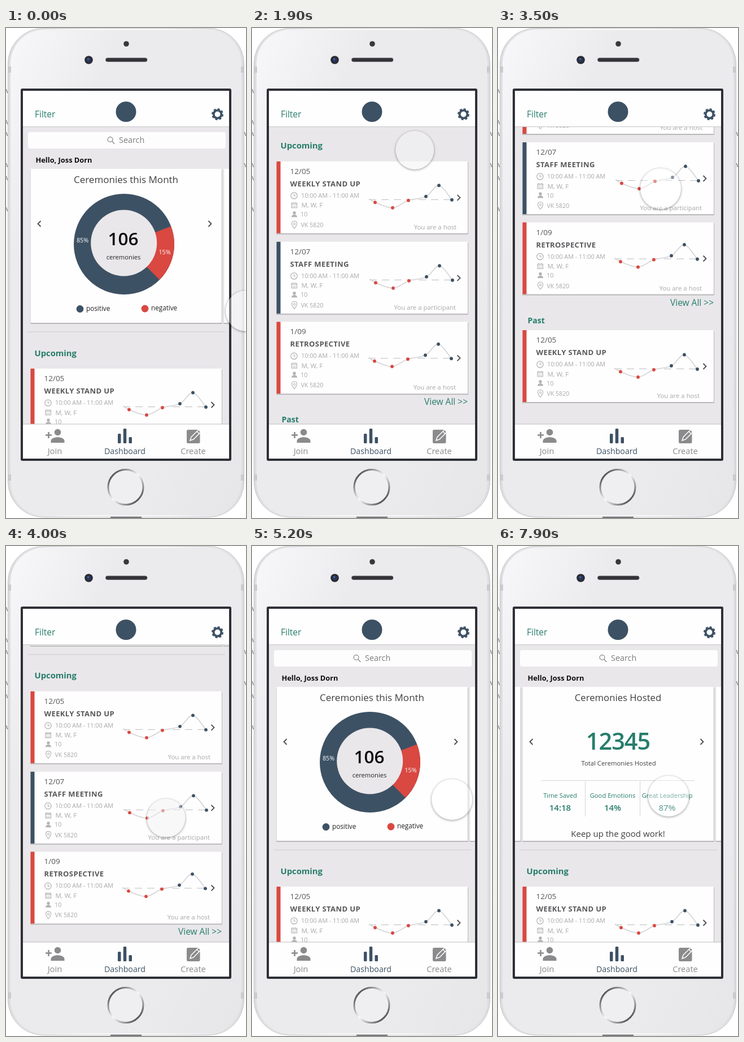
An HTML page for the animation above (8 s loop, 425 by 866 pixels).

```html
<!DOCTYPE html>
<html lang="en">
<head>
<meta charset="utf-8">
<title>Ceremony dashboard</title>
<style>
  html, body { margin: 0; width: 100%; height: 100%; overflow: hidden; background: #fff; }
  svg { position: absolute; left: 0; top: 0; display: block; }
  text { font-family: "Open Sans", "Noto Sans", sans-serif; white-space: pre; }
  #touch {
    position: absolute; left: 0; top: 0; border-radius: 50%;
    background: rgba(255, 255, 255, .38);
    box-shadow: 0 1px 4px rgba(0, 0, 0, .42);
  }
  #touch.down { background: rgba(244, 243, 245, .5); }
</style>
</head>
<body>
<svg id="stage" width="425" height="866" viewBox="0 0 425 866"></svg>
<div id="touch"></div>
<script>
const SLATE = '#3d5164', RED = '#d94841', TEAL = '#277d6b', BG = '#e9e7ea';
const GREY = '#8b8a8c', PALE = '#a9a8aa', INK = '#3f3f42', WHITE = '#fefefe';
const LOOP = 8000, STEP = 100, PAGE = 342, BOTTOM = 542;

// ---- drawing helpers ----
const text = (str, x, y, size, fill, o = {}) =>
  `<text x="${x}" y="${y}" font-size="${size}" fill="${fill}" font-weight="${o.w || 400}"` +
  ` text-anchor="${o.a || 'start'}" letter-spacing="${o.ls || 0}">${str}</text>`;
const mid = (str, x, y, size, fill, w) => text(str, x, y, size, fill, { a: 'middle', w });
const rect = (x, y, w, h, fill, rx = 0, extra = '') =>
  `<rect x="${x}" y="${y}" width="${w}" height="${h}" rx="${rx}" fill="${fill}" ${extra}/>`;
const dot = (x, y, r, fill, extra = '') =>
  `<circle cx="${x}" cy="${y}" r="${r}" fill="${fill}" ${extra}/>`;
const ring = (x, y, r, stroke, w, extra = '') =>
  dot(x, y, r, 'none', `stroke="${stroke}" stroke-width="${w}" ${extra}`);
const line = (d, stroke, w = 1, extra = '') =>
  `<path d="${d}" fill="none" stroke="${stroke}" stroke-width="${w}" ${extra}/>`;
const group = (x, y, body) => `<g transform="translate(${x} ${y})">${body}</g>`;
const chevron = (x, y, dir) =>
  line(`M${x - 2.5 * dir} ${y - 5}l${5 * dir} 5l${-5 * dir} 5`, '#4a4a4d', 1.8);
const panel = (y, h) =>
  rect(43, y + 1, 340, h + 1, '#b9b8ba', 1) + rect(43.5, y, 338.5, h, WHITE);

// smooth curve through points
function spline(pts) {
  let d = `M${pts[0]}`;
  for (let i = 0; i < pts.length - 1; i++) {
    const p = pts[i], q = pts[i + 1], a = pts[i - 1] || p, b = pts[i + 2] || q;
    d += `C${p[0] + (q[0] - a[0]) / 6} ${p[1] + (q[1] - a[1]) / 6}` +
      ` ${q[0] - (b[0] - p[0]) / 6} ${q[1] - (b[1] - p[1]) / 6} ${q}`;
  }
  return d;
}

// ---- meeting cards ----
const mood = [[218, 72.5], [249, 82], [277, 69], [308, 62], [331, 42.5], [354, 68]];

function chart() {
  return line('M207 67.5H358', '#bcbbbd', 1, 'stroke-dasharray="13 9"') +
    line(spline([[208, 66], ...mood]), '#d3d3d7', 1.6) +
    mood.map(([x, y], i) => dot(x, y, 2.9, i < 3 ? RED : SLATE)).join('');
}

function icons() {
  const c = '#b3b2b4';
  return ring(74.5, 60.5, 5.7, c, 1.2) + line('M74.5 57v4h3', c, 1.1) +
    line('M70 73.5h9.5v8.5h-9.5zM70 75.5h9.5M72.5 72v2M77 72v2', c, 1.1) +
    line('M71.5 78.5h6.5M71.5 80.3h6.5', c, 1, 'stroke-dasharray="1.4 1"') +
    dot(75, 91, 2.7, c) + `<path d="M70 98.5c0-6 10-6 10 0z" fill="${c}"/>` +
    line('M75 118.5c-7-8-5-13 0-13s7 5 0 13z', c, 1.1) + ring(75, 110.5, 1.7, c, 1);
}

function meeting({ y, date, title, role = 'host', dx = 0, dy = 0, end = 361 }) {
  const color = role === 'host' ? RED : SLATE;
  return group(0, y,
    panel(0, 127) + rect(43.5, 0, 7, 127, color) +
    text(date, 67.5, 22, 13.5, '#555457') +
    text(title, 67.5, 44, 13, '#58575a', { w: 700, ls: .4 }) +
    text('10:00 AM - 11:00 AM', 87, 64, 10.8, PALE) +
    text('M, W, F', 87.5, 81.5, 11.4, PALE) +
    text('10', 86, 97.5, 10.8, PALE) +
    text('VK 5820', 86.5, 116, 10.6, PALE) +
    text('You are a ' + role, end, 120, 11.4, PALE, { a: 'end' }) +
    icons() + group(dx, dy, chart()) + chevron(366, 64, 1));
}

const meetings = [
  { y: 602, date: '12/05', title: 'WEEKLY STAND UP', end: 362 },
  { y: 744, date: '12/07', title: 'STAFF MEETING', role: 'participant', dx: 1 },
  { y: 885.5, date: '1/09', title: 'RETROSPECTIVE', dx: -1, dy: -3 },
  { y: 1076, date: '12/05', title: 'WEEKLY STAND UP', dx: -1, dy: 1, end: 357 },
];

// ---- carousel pages ----
const blankPage = panel(249, 272);
const page = blankPage + chevron(59, 346, -1) + chevron(361, 346, 1);

function donutPage() {
  const at = (r, deg) => {
    const a = deg * Math.PI / 180;
    return `${209 + r * Math.cos(a)} ${382 + r * Math.sin(a)}`;
  };
  return page + mid('Ceremonies this Month', 212.5, 274, 17, INK) +
    dot(209, 382, 89, SLATE) +
    `<path d="M209 382L${at(89, -20.7)}A89 89 0 0 1 ${at(89, 45)}z" fill="${RED}"/>` +
    dot(208.7, 380, 58.5, BG) +
    mid('106', 207.5, 383.5, 31.5, '#0c0c0d', 600) +
    mid('ceremonies', 208, 409, 11.2, '#222') +
    mid('85%', 135.5, 379, 10.8, '#fff') + mid('15%', 281, 400, 10.8, '#fff') +
    dot(131, 496.5, 6.4, SLATE) + dot(246, 496, 6.4, RED) +
    text('positive', 142, 499.5, 11.7, '#222') + text('negative', 257, 498.5, 11.7, '#222');
}

function totalsPage() {
  const stat = (label, value, x) =>
    mid(label, x, 445, 11.2, TEAL) + mid(value, x, 467.5, 15, TEAL, 600);
  return page + mid('Ceremonies Hosted', 212.5, 274, 16.7, INK) +
    text('12345', 212.5, 359.5, 41.5, TEAL, { a: 'middle', w: 600, ls: -1 }) +
    mid('Total Ceremonies Hosted', 213.5, 388, 11.3, INK) +
    line('M76 414.5H348M154.5 416V478M251.5 416V478', '#d6d5d7') +
    stat('Time Saved', '14:18', 110) + stat('Good Emotions', '14%', 203) +
    stat('Great Leadership', '87%', 299.5) +
    mid('Keep up the good work!', 212.5, 514, 15, INK);
}

function content() {
  const pages = [donutPage(), totalsPage(), blankPage];
  return rect(39, 184, 350, 29, '#fdfdfd', 4) +
    ring(184.5, 197, 4.4, GREY, 1.3) + line('M187.8 200.3l4.5 4.6', GREY, 1.4) +
    text('Search', 200, 203, 14.4, '#7d7c7f') +
    text('Hello, Joss Dorn', 52.5, 237.5, 12.8, '#0d0d0e', { w: 700 }) +
    `<g id="pages">${pages.map((p, i) => group(i * PAGE, 0, p)).join('')}</g>` +
    line('M38 537H388', '#cdcbce') +
    text('Upcoming', 50.5, 579.5, 14.8, TEAL, { w: 700 }) +
    meetings.map(meeting).join('') +
    text('View All &gt;&gt;', 382, 1032.5, 15.5, TEAL, { a: 'end' }) +
    text('Past', 52.5, 1063.5, 14, TEAL, { w: 700 });
}

// ---- fixed parts ----
function phone() {
  let edges = '';
  for (const x of [3, 416])
    for (const y of [68, 789]) edges += rect(x, y, 6, 11, '#cbcacd');
  for (const y of [108, 184, 262])
    edges += line(`M.5 ${y}l2 7M.5 ${y + 55}l2 7`, '#555');
  edges += line('M422.5 184l2 7M422.5 239l2 7', '#555');
  return rect(3.5, .5, 418, 864, 'url(#rim)', 63, 'stroke="#c4c3c7"') +
    rect(8, 3.5, 409, 858, 'url(#face)', 59) + edges +
    rect(185, 863.5, 55, 2.5, '#77767a') +
    dot(213, 28, 4.8, '#38373b') +
    dot(146.5, 56.5, 7.3, '#2a2b32') + dot(146.5, 56.5, 4, '#27375f') + dot(145.5, 55, 1.4, '#5870a8') +
    rect(176.5, 53, 73.5, 6.5, '#343337', 3.2, 'stroke="#5b5a5e" stroke-width=".8"') +
    dot(212, 811.5, 31, '#efeef0') + ring(212, 811.5, 31, 'url(#metal)', 3) +
    rect(28, 109, 369, 654, BG, 1, 'stroke="#2e3036" stroke-width="4"');
}

function bars() {
  const gear = ring(374.5, 152.5, 6.8, SLATE, 3.8) +
    ring(374.5, 152.5, 9.3, SLATE, 2.4, 'stroke-dasharray="4 3.3"');
  const join = line('M70 719.5h11M75.5 714v11', GREY, 2.6) +
    dot(91.5, 714.5, 5.8, GREY) + `<path d="M79.5 733v-3c0-9 24-9 24 0v3z" fill="${GREY}"/>`;
  const columns = [717, 708, 723].map((y, i) =>
    rect(198 + 9.75 * i, y, 5.5, 734 - y, SLATE, 1.5)).join('');
  const create = rect(320, 710, 23.5, 24, GREY, 2.5) +
    line('M326 729l2-6l13-13l4 4l-13 13zM338 713l4 4', WHITE, 1.5);
  return rect(30, 111, 365, 63.5, WHITE) + line('M30 174.5H395', '#c6c5c7') +
    text('Filter', 51, 158, 15.5, TEAL) + dot(212.5, 148, 18, SLATE) + gear +
    rect(30, 700, 365, 61, WHITE) + line('M30 700H395', '#bdbcbe') +
    join + columns + create +
    mid('Join', 86.5, 753, 14.8, GREY) + mid('Dashboard', 210.5, 753, 14.2, SLATE) +
    mid('Create', 331.5, 753, 14.6, GREY);
}

const gradient = (id, dir, colors) => `<linearGradient id="${id}" ${dir}>` +
  colors.map((c, i) => `<stop offset="${i / (colors.length - 1)}" stop-color="${c}"/>`).join('') +
  '</linearGradient>';

document.getElementById('stage').innerHTML = '<defs>' +
  gradient('rim', '', ['#dddcdf', '#fafafb', '#fafafb', '#dddcdf']) +
  gradient('face', 'x2="1" y2="1"', ['#f8f7f9', '#ebeaec', '#ebeaec', '#ebeaec', '#e6e5e8']) +
  gradient('metal', 'x2="1" y2="1"', ['#111', '#8d8c90', '#fbfbfb', '#8d8c90', '#111']) +
  '<clipPath id="view"><rect x="30" y="174" width="365" height="526"/></clipPath></defs>' +
  phone() + `<g clip-path="url(#view)"><g id="scroll">${content()}</g></g>` + bars();

// ---- motion ----
const scrollEl = document.getElementById('scroll');
const pagesEl = document.getElementById('pages');
const touch = document.getElementById('touch');

function ease(t, from, to) {
  const u = Math.min(1, Math.max(0, (t - from) / (to - from)));
  return u * u * (3 - 2 * u);
}

function draw(now) {
  const t = Math.floor(now % LOOP / STEP) * STEP;
  const e = (from, to) => ease(t, from, to);
  const up = BOTTOM * e(1000, 2453);
  const down = BOTTOM * e(3600, 4581);
  const swipe = PAGE * e(6200, 7044);

  // the finger follows each drag until it lets go, then travels to the next spot
  const x = 425 - 130 * e(0, 900) - 7 * e(1200, 2000) - 9 * e(3600, 4400) +
    89 * e(4600, 5400) - 69 * e(5450, 6200) - Math.min(swipe, 187) + 190 * e(7300, 7900);
  const y = 500 + 82 * e(0, 900) - Math.min(up, 420) + 122 * e(2300, 3200) +
    Math.min(down, 214) - 50 * e(4000, 4400) - 6 * e(7300, 7900);
  const held = (pull, limit) => pull > 0 && pull < limit;
  const pressed = held(up, 420) || held(down, 214) || held(swipe, 187);
  const r = pressed ? 34 : 36;

  scrollEl.setAttribute('transform', `translate(0 ${down - up})`);
  pagesEl.setAttribute('transform', `translate(${-swipe} 0)`);
  touch.className = pressed ? 'down' : '';
  touch.style.width = touch.style.height = 2 * r + 'px';
  touch.style.transform = `translate(${x - r}px, ${y - r}px)`;
}

let start;
function tick(now) {
  if (start === undefined) start = now;
  draw(now - start);
  requestAnimationFrame(tick);
}
draw(0);
requestAnimationFrame(tick);
</script>
</body>
</html>
```
